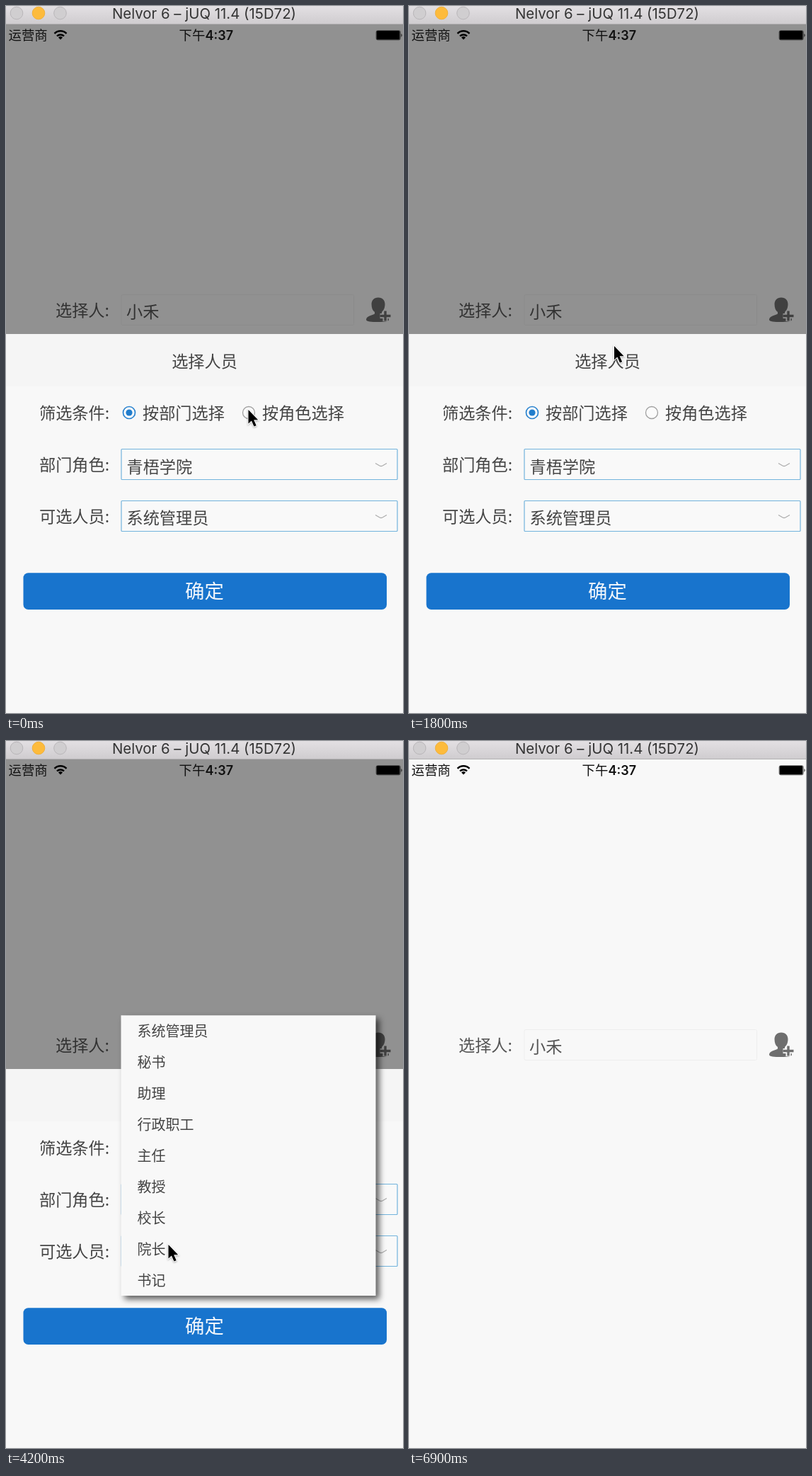
Animation, 561 px wide and 998 px high, one loop 7200 ms. Source, as an HTML page:

```html
<!DOCTYPE html>
<html lang="zh-CN">
<head>
<meta charset="utf-8">
<title>选择人员</title>
<style>
  html, body { margin: 0; width: 100%; height: 100%; overflow: hidden; background: #f8f8f8; }
  svg { display: block; width: 100%; height: 100%; }
  text { font: 23.2px "Noto Sans CJK SC", "Noto Sans CJK", sans-serif; font-weight: 350; fill: #444; }
  .mid { text-anchor: middle; }
  .bar { font-family: Inter, "Noto Sans CJK SC", sans-serif; fill: #111; }
  #page text { fill: #555; }
  .select { fill: #f9f9f9; stroke: #72b3dc; stroke-width: 1.2; }
  .chevron { fill: none; stroke: #adadad; stroke-width: 1.3; }
  #menu rect { fill: #f8f8f8; filter: drop-shadow(5px 5px 4px rgba(0, 0, 0, .62)); }
  #cursor { filter: drop-shadow(0 1px 1px rgba(0, 0, 0, .3)); }
</style>
</head>
<body>
<svg viewBox="0 0 561 998" preserveAspectRatio="none">
  <defs>
    <linearGradient id="chrome" x2="0" y2="1">
      <stop stop-color="#e3e0e3"/><stop offset="1" stop-color="#cfcccf"/>
    </linearGradient>
  </defs>
  <rect width="561" height="998" fill="#f8f8f8"/>

  <g id="page">
    <rect x="163" y="407.5" width="328.5" height="43" rx="2" fill="none" stroke="#eee"/>
    <g fill="#6e6e6e">
      <path d="M526 411.500C532 411.500 535.500 415.500 535.500 421C535.500 426 533.500 430 531 432V435C536 437 541 438 541 443C541 445 536 446 526 446C516 446 509 445.500 509 443C509 437.500 516 437.500 521 434.500V432C518 430 516.500 426 516.500 421C516.500 415.500 520 411.500 526 411.500Z"/>
      <path d="M536 430V445M528.500 437.500H543.500" stroke="#f8f8f8" stroke-width="7"/>
      <path d="M536 430.500V444.500M528.500 437.500H543.500" stroke="#6e6e6e" stroke-width="3.400"/>
    </g>
  </g>
  <rect id="shade" y="26" width="561" height="972" fill="#000" opacity=".415"/>

  <g id="status">
    <g transform="translate(0 -.7)">
      <path d="M68.500 39.500A12 12 0 0 1 85.500 39.500M72 43.200A7 7 0 0 1 82 43.200" fill="none" stroke="#000" stroke-width="2.500"/>
      <path d="M74 45.200A4.300 4.300 0 0 1 80 45.200L77 48.300Z"/>
    </g>
    <rect x="523" y="34.500" width="34.500" height="13.500" rx="2.500" fill="none" stroke="#000" stroke-opacity=".4"/>
    <rect x="523.500" y="35" width="33" height="12.500" rx="1.500"/>
    <path d="M558.500 39Q560.500 41 558.500 44Z"/>
  </g>
  <rect width="561" height="25.500" fill="url(#chrome)"/>
  <rect y="25" width="561" height="1" fill="#b3b1b3"/>
  <g fill="#d0ced0" stroke="#b9b6b9">
    <circle cx="15" cy="10" r="8.800"/>
    <circle cx="46" cy="10" r="8.800" fill="#fdbb3c" stroke="#efb03c"/>
    <circle cx="76.500" cy="10" r="8.800"/>
  </g>

  <g id="sheet">
    <rect y="463" width="561" height="535" fill="#f8f8f8"/>
    <rect y="463" width="561" height="74" fill="#f5f5f5"/>
    <rect class="select" x="163" y="625.500" width="390" height="43" rx="1"/>
    <rect class="select" x="163" y="698.500" width="390" height="43" rx="1"/>
    <path class="chevron" d="M522 645.500L528 649Q530 650 532 649L538 645.500M522 718.500L528 722Q530 723 532 722L538 718.500"/>
    <rect id="button" x="24.500" y="800.300" width="513.500" height="51.700" rx="7"/>
  </g>
  <g id="menu"></g>
  <path id="cursor" d="M0 0V19.500L4.400 15.400L8 23.500L11.200 22.200L7.700 14.300H13.700Z" stroke="#fff" stroke-width="2" paint-order="stroke"/>
</svg>
<script>
const NS = 'http://www.w3.org/2000/svg';
const $ = id => document.getElementById(id);

function add(parent, tag, attrs) {
  const el = document.createElementNS(NS, tag);
  for (const key in attrs) el.setAttribute(key, attrs[key]);
  return parent.appendChild(el);
}

// Places text by the vertical centre of its glyphs.
function label(parent, text, x, centre, size = 23.2, cls = '', style = '') {
  const el = add(parent, 'text', {
    x, y: centre + size * 0.38, class: cls, style: `font-size:${size}px;${style}`
  });
  el.textContent = text;
  return el;
}

const svg = document.querySelector('svg'), sheet = $('sheet'), status = $('status');
const PERSON = '小禾', SCHOOL = '青梧学院', ADMIN = '系统管理员', STAFF = '行政职工';

label($('page'), '选择人:', 70, 429);
label($('page'), PERSON, 170, 431);
label(status, '运营商', 3.5, 41, 18.4, '', 'fill:#111');
label(status, '下午', 244.5, 41, 18.4, '', 'fill:#111;font-weight:500');
label(status, '4:37', 281.5, 41, 18, 'bar', 'font-weight:600');
const title = label(svg, 'Nelvor 6 – jUQ 11.4 (15D72)', 280, 10.5, 20.4, 'bar mid', 'fill:#333;font-weight:400');
svg.insertBefore(title, sheet);

label(sheet, '选择人员', 280.5, 501, 23.2, 'mid');
label(sheet, '筛选条件:', 47, 574);
label(sheet, '部门角色:', 47, 647);
label(sheet, '可选人员:', 47, 720);
label(sheet, '按部门选择', 193, 574);
label(sheet, '按角色选择', 362, 574);
label(sheet, '确定', 280.5, 826, 27.4, 'mid', 'fill:#f1f6fb');
const groupText = label(sheet, '', 170.5, 650);
const personText = label(sheet, '', 170.5, 722.5);

const radios = [174, 343].map(cx => ({
  ring: add(sheet, 'circle', { cx, cy: 574, r: 8.5, fill: '#fbfbfb' }),
  dot: add(sheet, 'circle', { cx, cy: 574, r: 4.6, fill: '#217dcc' })
}));

const MENUS = {
  departments: [SCHOOL, SCHOOL, '　　财务处', '招生办', '工会', '工会分部', '国资处',
    '科研处', '党政办', '信息科', '秘书科', '综合科', '文秘室'],
  roles: [ADMIN, '秘书', '助理', STAFF, '主任', '教授', '校长', '院长', '书记']
};
const ROW = 43.9, LAST_ROW = 761;
const menus = {};
for (const [name, items] of Object.entries(MENUS)) {
  const group = menus[name] = add($('menu'), 'g', {});
  const first = LAST_ROW - ROW * (items.length - 1);
  add(group, 'rect', { x: 162.5, y: first - 22.5, width: 360, height: LAST_ROW + 44.5 - first });
  items.forEach((item, i) => {
    const indent = item.startsWith('　') ? 40 : 0;
    label(group, item.trim(), 185.5 + indent, first + ROW * i, 20);
  });
}

// Each step holds for STEP ms; changes carry over to the following steps.
const STEP = 300;
const CHANGES = [
  { at: [342.5, 570], radio: 0, group: SCHOOL, person: ADMIN, menu: '', open: true, pressed: false },
  { at: [310, 584] },
  { at: [230, 638] },
  { at: [203, 652], menu: 'departments' },
  {},
  { at: [212, 240] },
  { at: [290, 480], menu: '' },
  { at: [342.5, 570], radio: 1, group: ADMIN },
  { at: [300, 638] },
  { at: [292, 646], menu: 'roles' },
  {},
  { at: [278, 660] },
  { at: [258, 682] },
  { at: [238, 702] },
  { at: [229.5, 711] },
  { at: [231, 680] },
  { at: [234, 615] },
  { at: [235.5, 564] },
  { at: [237, 540], menu: '', group: STAFF, person: PERSON },
  { at: [252, 735] },
  { at: [260.5, 822], pressed: true },
  { at: [438, 658], open: false },
  { at: null },
  {}
];
let carried = {};
const steps = CHANGES.map(change => carried = { ...carried, ...change });

const show = (el, visible) => el.setAttribute('display', visible ? 'inline' : 'none');

function render(s) {
  show(sheet, s.open);
  show($('shade'), s.open);
  for (const name in menus) show(menus[name], s.menu === name);
  groupText.textContent = s.group;
  personText.textContent = s.person;
  radios.forEach(({ ring, dot }, i) => {
    const on = s.radio === i;
    ring.setAttribute('stroke', on ? '#2a83cf' : '#a0a0a0');
    ring.setAttribute('stroke-width', on ? 1.7 : 1.3);
    show(dot, on);
  });
  $('button').setAttribute('fill', s.pressed ? '#0a3863' : '#1874cd');
  show($('cursor'), s.at);
  if (s.at) $('cursor').setAttribute('transform', `translate(${s.at})`);
}

let current = -1;
const start = performance.now();
function tick(now) {
  const index = Math.floor(Math.max(0, now - start) / STEP) % steps.length;
  if (index !== current) render(steps[current = index]);
  requestAnimationFrame(tick);
}
tick(start);
</script>
</body>
</html>
```
